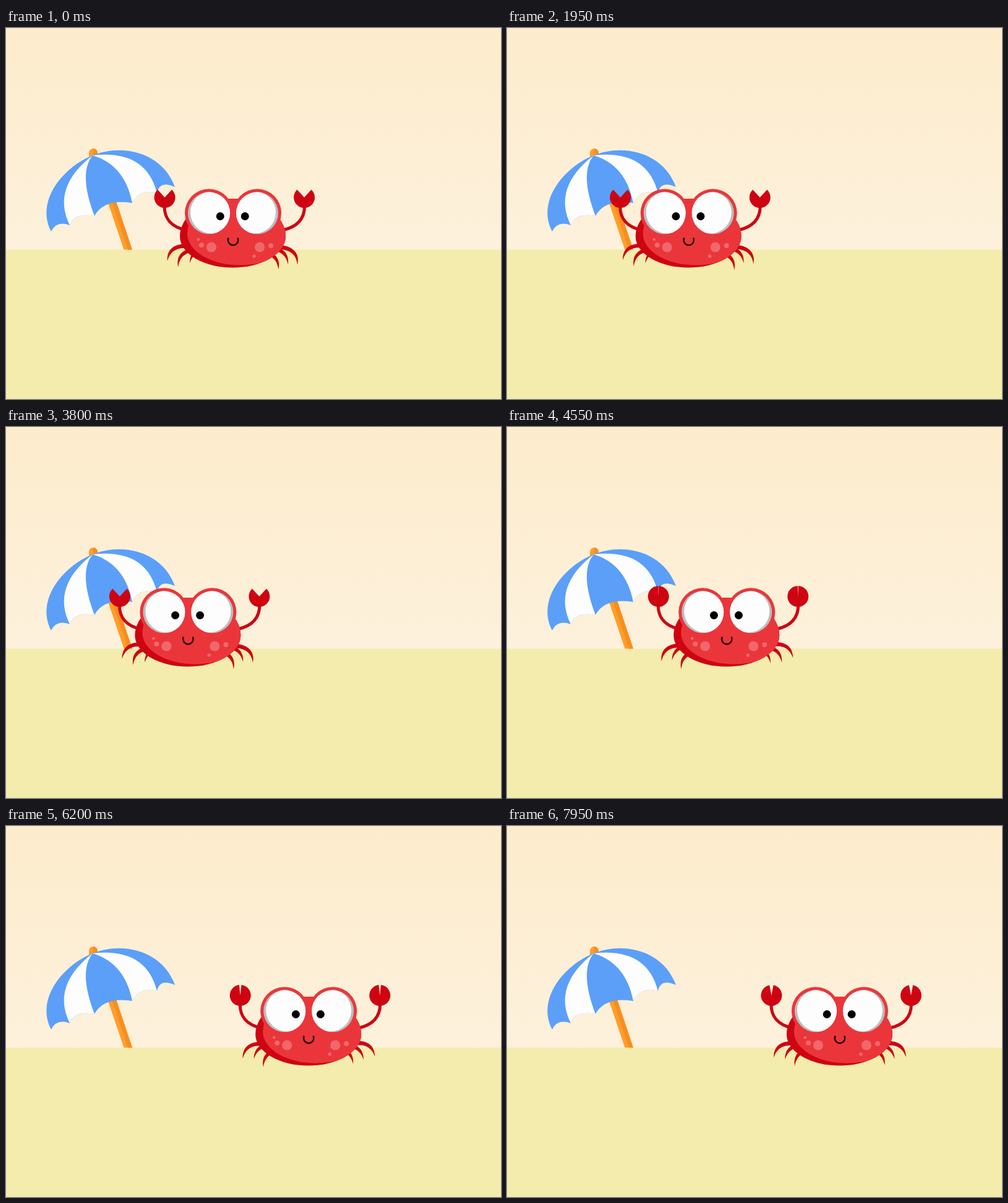
An HTML page with a canvas that plays this animation: 800x600 px, repeating every 8000 ms.

```html
<!DOCTYPE html>
<html lang="en">
<head>
<meta charset="utf-8">
<title>Crab on the beach</title>
<style>
html, body { margin: 0; width: 100%; height: 100%; overflow: hidden; background: #f4ecad; }
canvas { display: block; width: 800px; height: 600px; }
</style>
</head>
<body>
<canvas id="stage" width="800" height="600"></canvas>
<script>
const ctx = document.getElementById('stage').getContext('2d');
const TAU = Math.PI * 2;
const LOOP = 8000, FPS = 15;
const BEAT = 919; // half a cycle of claws and legs, in ms

const RED = '#ea363b', DARK = '#ce0412', BLUE = '#5b9ff8', WHITE = '#fdfdfd';
const ORANGE = '#ff9e2a', RUST = '#f88e1e';

// The standard "ease" curve, solved by bisection.
function ease(x) {
  let lo = 0, hi = 1;
  for (let i = 0; i < 24; i++) {
    const s = (lo + hi) / 2;
    if (0.75 * s - 0.75 * s * s + s * s * s < x) lo = s; else hi = s;
  }
  return 0.3 * lo + 2.4 * lo * lo - 1.7 * lo ** 3;
}

// Swings 0 -> 1 -> 0, easing each way; phase counts half cycles.
function swing(phase) {
  const p = ((phase % 2) + 2) % 2;
  return p < 1 ? ease(p) : 1 - ease(p - 1);
}

function fillPath(d, color) {
  ctx.fillStyle = color;
  ctx.fill(new Path2D(d));
}

function disc(x, y, r, color) {
  ctx.fillStyle = color;
  ctx.beginPath();
  ctx.arc(x, y, r, 0, TAU);
  ctx.fill();
}

// ---- scenery ----
const sky = ctx.createLinearGradient(0, 0, 0, 358);
sky.addColorStop(0, '#fdeccc');
sky.addColorStop(1, '#fdf1dc');

function drawBeach() {
  ctx.fillStyle = sky;
  ctx.fillRect(0, 0, 800, 359);
  ctx.fillStyle = '#f4ecad';
  ctx.fillRect(0, 358.5, 800, 242);
}

const CANOPY = 'M140 206C185 187 252 199 273 257Q248 246 244 267Q216 259 204 283' +
  'Q158 276 143 304Q110 298 103 319Q82 311 73 329C46 276 98 222 140 206Z';
const PANELS = [
  'M140 206Q73 258 103 319Q110 298 143 304Q116.5 235 140 206Z',
  'M140 206Q192 221.5 204 283Q216 259 244 267Q226 196 140 206Z'
];

function drawUmbrella() {
  fillPath('M164 280L176.5 276L204 358.5L190.5 358.5Z', ORANGE);
  fillPath('M170 278L176.5 276L204 358.5L197 358.5Z', RUST);
  fillPath('M134 208V202A7 7 0 0 1 148 202L147 207Z', ORANGE);
  fillPath('M141 207V195A7 7 0 0 1 148 202L147 206Z', RUST);
  fillPath(CANOPY, BLUE);
  for (const panel of PANELS) fillPath(panel, WHITE);
}

// ---- crab ----
// When in the cycle each leg reaches lowest, outer to inner.
const LEFT_PEAKS = [0.7, 0.9, 0.5];
const RIGHT_PEAKS = [0.9, 0.75, 0.1];

function drawLeg(side, i, peak, t) {
  const reach = 45, drop = 14 * i - 8;
  const lift = (1 + Math.cos(TAU * (t / (2 * BEAT) - peak))) / 2;
  ctx.save();
  ctx.scale(-side, 1);
  ctx.translate(reach - 107 + 18.5 * i, 373 + 3.5 * i + drop);
  ctx.rotate(-0.25 * lift);
  ctx.translate(-reach, -drop);
  fillPath('M0 0C0 -16 10 -27 32 -25L33 -18C15 -21 5 -14 0 0Z', DARK);
  ctx.restore();
}

function drawLegs(t) {
  LEFT_PEAKS.forEach((peak, i) => drawLeg(-1, i, peak, t));
  RIGHT_PEAKS.forEach((peak, i) => drawLeg(1, i, peak, t));
}

function drawClaw(x, open) {
  ctx.fillStyle = DARK;
  ctx.beginPath();
  ctx.moveTo(x, 274);
  ctx.arc(x, 274, 17, -TAU / 4 + open, TAU * 0.75 - open);
  ctx.fill();
}

function drawArms(open) {
  ctx.strokeStyle = DARK;
  ctx.lineWidth = 5;
  ctx.stroke(new Path2D('M-111 288C-111 306 -103 321 -76 327M115.5 288C115.5 306 107 321 80 327'));
  drawClaw(-110.5, open);
  drawClaw(115, open);
}

const BODY = new Path2D('M-86 337A85.5 61 0 0 1 85 337A85.5 50.5 0 0 1 -86 337Z');

function drawBody() {
  ctx.fillStyle = DARK;
  ctx.fill(BODY);
  ctx.save();
  ctx.clip(BODY);
  ctx.translate(12, -4);
  ctx.fillStyle = RED;
  ctx.fill(BODY);
  ctx.restore();
}

function drawEye(side) {
  const x = side * 39, y = 299.3;
  disc(x, y, 34, '#bdbdbd');
  ctx.save();
  ctx.beginPath();
  ctx.arc(x, y, 34, 0, TAU);
  ctx.clip();
  disc(x - side * 4, y - 1, 34, WHITE);
  ctx.restore();
  disc(side * 20 - 0.8, 304.5, 6.5, '#000');
}

function drawFace() {
  for (const side of [-1, 1]) disc(side * 39, 299.3, 39, RED);
  for (const side of [-1, 1]) drawEye(side);
  const spots = [[-35, 354.5, 8], [-51, 351, 4], [-56, 342, 2.3],
    [43, 354.5, 8], [61, 352, 4], [34, 369, 2.8]];
  for (const [x, y, r] of spots) disc(x, y, r, '#f0686c');
  ctx.strokeStyle = '#2e0a0b';
  ctx.lineWidth = 2.6;
  ctx.beginPath();
  ctx.arc(0, 343, 8.2, -0.45, Math.PI + 0.45);
  ctx.stroke();
}

function crabX(t) {
  const LEFT = 282, RIGHT = 545, WALK = 5690, TURN = 3437;
  return LEFT + (RIGHT - LEFT) * swing((t - TURN) / WALK);
}

function drawCrab(t) {
  ctx.save();
  ctx.translate(crabX(t), 0);
  drawLegs(t);
  drawArms(0.75 * swing(0.819 + t / BEAT));
  drawBody();
  drawFace();
  ctx.restore();
}

function frame(now) {
  // Pictures change 15 times a second, on a 50 ms grid.
  const tick = Math.floor((now % LOOP) / 50) * 50;
  const t = Math.floor((tick + 25) * FPS / 1000) * 1000 / FPS;
  drawBeach();
  drawUmbrella();
  drawCrab(t);
  requestAnimationFrame(() => frame(performance.now() - start));
}

const start = performance.now();
frame(0);
</script>
</body>
</html>
```
